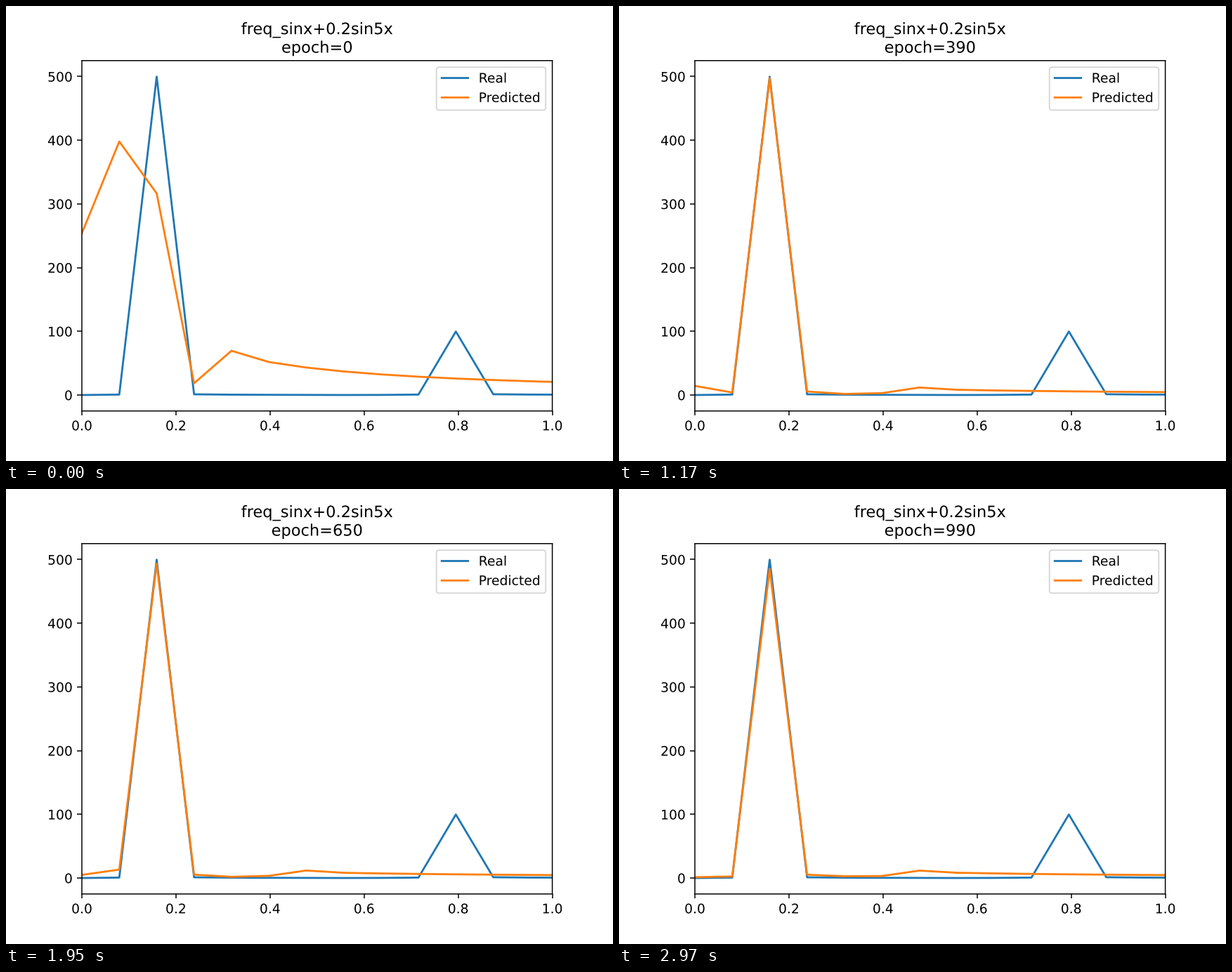
Recreate the animation shown at these times as a matplotlib script. Size 864 by 648 pixels, loop 3 s.

```python
import matplotlib.pyplot as plt
import numpy as np
from matplotlib.animation import FuncAnimation
from matplotlib.patheffects import Normal

FRAMES = 100
STEP = 10      # epochs per frame
BINS = 14
SETTLE = 42    # epochs for the first fast convergence

# Unhinted outlines and no pixel snapping, for smooth text and axes
plt.rcParams.update({
    "text.hinting": "no_hinting",
    "path.snap": False,
    "path.effects": [Normal()],
})

# Real spectrum of sin(x) + 0.2 sin(5x)
N = 1000
x = np.linspace(-2 * np.pi, 2 * np.pi, N)
freq = np.fft.fftfreq(N, x[1] - x[0])[:BINS]
real = np.abs(np.fft.fft(np.sin(x) + 0.2 * np.sin(5 * x)))[:BINS]

k = np.arange(BINS)
jitter = np.random.default_rng(4).normal(size=(FRAMES, BINS)) * 3 * np.exp(-k / 2)


def spectrum(head, tail):
    """Low bins as given, the rest falling off as tail / k."""
    return np.concatenate([head, tail / k[len(head):]])


start = spectrum([254, 398, 316.5, 18.5, 69.5], 259)


def settled(epoch):
    """Low frequencies keep drifting while the others rest."""
    sway = np.cos(2 * np.pi * (epoch - 780) / 600)
    return spectrum([16 - 0.015 * epoch, 12 + 11 * sway,
                     505 - 0.02 * epoch, 5, 2, 3, 11.7], 58)


def predicted(i):
    epoch = i * STEP
    left = np.exp(-epoch / SETTLE)
    return np.abs(left * start + (1 - left) * (settled(epoch) + jitter[i]))


def heading(i):
    return f"freq_sinx+0.2sin5x\nepoch={i * STEP}"


fig, ax = plt.subplots(figsize=(6.4, 4.8), dpi=135)
ax.plot(freq, real, label="Real")
fit, = ax.plot(freq, predicted(0), label="Predicted")
ax.set_xlim(0, 1)
ax.set_ylim(-25, 525)
ax.legend(loc="upper right")
title = ax.set_title(heading(0))


def update(i):
    fit.set_ydata(predicted(i))
    title.set_text(heading(i))
    return fit, title


anim = FuncAnimation(fig, update, frames=FRAMES, interval=30, repeat=True,
                     repeat_delay=0, blit=False)
plt.show()
```
